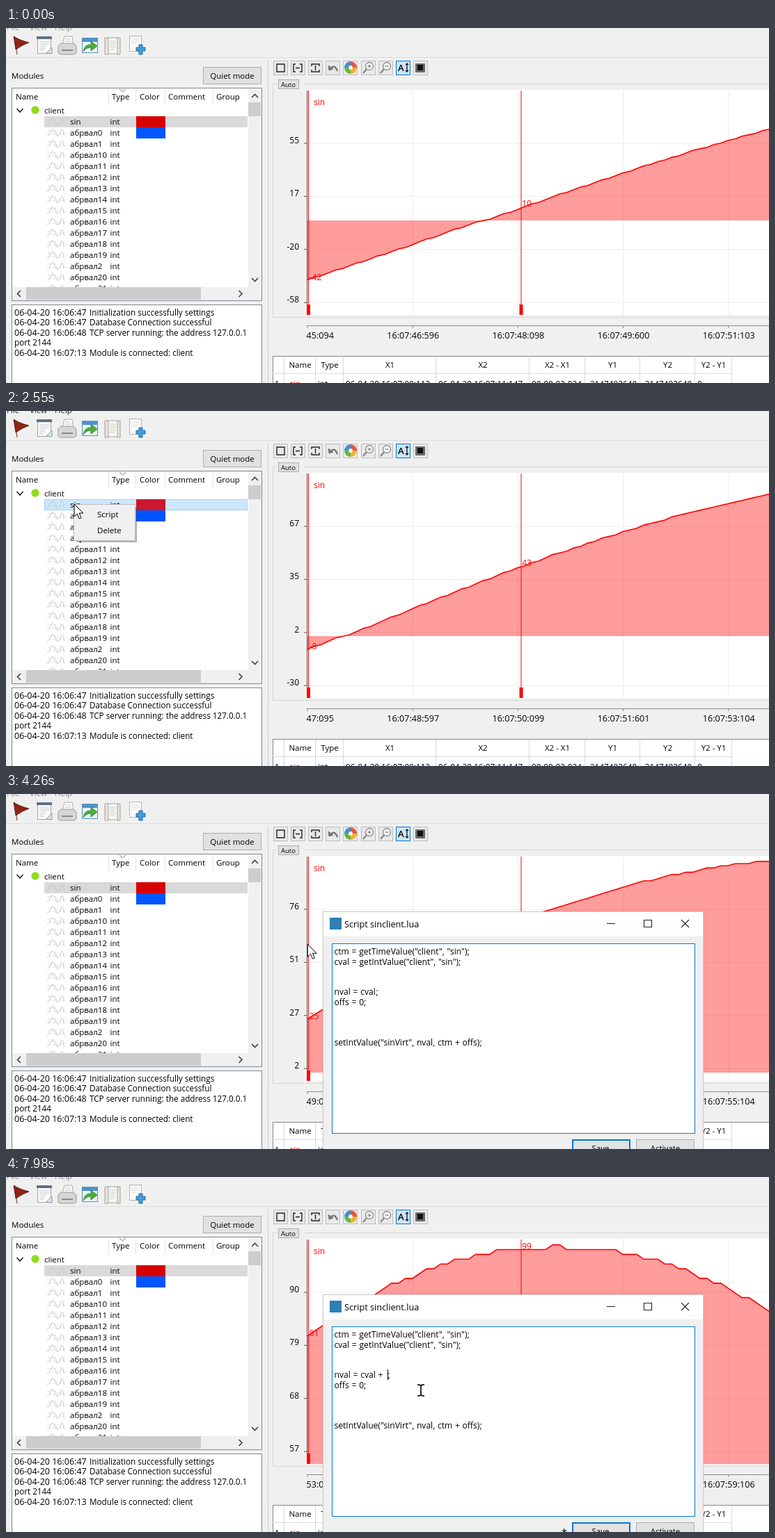
Animation, 1096 px wide and 511 px high, one loop 8 s. Source, as an HTML page:

```html
<!DOCTYPE html>
<html lang="en">
<head>
<meta charset="utf-8">
<title>Script editor over a live chart</title>
<style>
html, body { margin: 0; width: 100%; height: 100%; overflow: hidden; background: #f0f0f0; }
svg { display: block; width: 100vw; height: 100vh; }
text { font-family: "Open Sans", "Noto Sans", sans-serif; white-space: pre; }
.code { word-spacing: .6px; }
</style>
</head>
<body>
<svg id="stage" viewBox="0 0 1096 511" xmlns="http://www.w3.org/2000/svg"></svg>
<script>
const LOOP = 8000;
const GRID_X = 151.2, GRID_Y = 76.4, PLOT_X = 433, TOP_Y = 166, SAMPLE = 10.066;
const stage = document.getElementById('stage');

const rect = (x, y, w, h, fill, extra = '') =>
  `<rect x="${x}" y="${y}" width="${w}" height="${h}" fill="${fill}" ${extra}/>`;
const frame = (x, y, w, h, fill, stroke, extra = '') =>
  rect(x + .5, y + .5, w - 1, h - 1, fill, `stroke="${stroke}" ${extra}`);
const path = (d, stroke, width = 1, fill = 'none', extra = '') =>
  `<path d="${d}" stroke="${stroke}" stroke-width="${width}" fill="${fill}" ${extra}/>`;
const label = (x, y, s, size = 11.5, extra = '') =>
  `<text x="${x}" y="${y}" font-size="${size}" ${extra}>${s}</text>`;
const mid = 'text-anchor="middle"';

function mainToolbar() {
  return ['File', 'View', 'Help'].map((s, i) => label([1, 34, 70][i], 3, s, 11.5, 'class="bar"')).join('') +
    path('M0 42.5H1096', '#dcdcdc') +
    // flag
    path('M12 12L16 38', '#8a6f60', 1.6) + path('M11 12Q18 17 33 21Q24 24 14 31Z', '#4d130d', .8, '#8d2415') +
    // notebook
    frame(45, 14, 20, 23, '#fbfbfb', '#9aa3ad') + rect(44, 12, 22, 4, '#5f7186') +
    path('M48 20H62M48 23H62M48 26H58M48 29H56M48 32H55', '#bcc6d0') + path('M58 36L66 28V37Z', '#8a95a0', 1, '#dfe4e9') +
    // printer
    path('M81 24L84 12H95L97 24', '#aaa', 1, '#fff') + path('M85 16H93M84 19H94', '#c4c4c4') +
    path('M75 26L79 22H97L101 26V36L98 38H78L75 36Z', '#999', 1, '#d6d6d6') + rect(80, 31, 16, 2, '#8a8a8a') +
    // picture with arrow
    frame(109, 14, 23, 22, '#e9f3fb', '#5b8fb5') + rect(110, 15, 21, 5, '#4c94cf') +
    path('M111 34Q113 23 122 24V19L131 26L122 33V28Q115 28 111 34Z', '#2f7d25', .8, '#4bae3c') +
    // scroll
    path('M145 14H161V37H145Z', '#a5a29a', 1, '#fafaf8') + path('M142 14H147V38H142ZM160 14H164V38H160Z', '#a5a29a', 1, '#e6e4df') +
    path('M149 19H158M149 22H158M149 25H157M149 28H158M149 31H156', '#c8c5bd') +
    // page with plus
    frame(177, 11, 18, 23, '#fafafa', '#b5b5b5') + path('M180 16H192M180 19H192M180 22H188', '#ddd') +
    path('M187 28H191V24H196V28H200V33H196V38H191V33H187Z', '#246ca5', 1, '#459bd8');
}

function chartToolbar() {
  const bold = d => path(d, '#222', 1.4);
  let s = '';
  for (let i = 0; i < 9; i++) {
    const on = i === 7;
    s += frame(Math.round(384 + i * 25.1), 47, 21, 21, on ? '#cce4f7' : '#e9e9e9', on ? '#0078d7' : '#bdbdbd');
  }
  s += bold('M389 52H400V63H389Z') +
    bold('M416 52H413V63H416M422 52H425V63H422M416 57.5H422') +
    bold('M439 55V52H450V55M439 60V63H450V60M444.5 54V61') +
    path('M465 59Q472 51 476 62', '#777', 2.4) + path('M463 54L464 61L470 59Z', '#777', 1, '#777');
  ['#e8533c', '#f0b429', '#69b543', '#3c91d6'].forEach((c, i) => {
    s += path('M495 57V48A9 9 0 0 1 504 57Z', 'none', 0, c, `transform="rotate(${i * 90} 495 57)"`);
  });
  s += '<circle cx="495" cy="57" r="3" fill="#f4f4f4"/>';
  for (const x of [522, 547])
    s += `<circle cx="${x}" cy="55" r="5.5" fill="#f7f7f7" stroke="#888" stroke-width="1.3"/>` +
      path(`M${x - 4} 59L${x - 9} 65`, '#888', 2.4) + path(`M${x - 2.5} 55H${x + 2.5}` + (x < 530 ? `M${x} 52.5V57.5` : ''), '#666');
  return s + label(563, 62, 'A', 13, 'font-weight="600"') + bold('M576 51V63M574 53L576 51L578 53M574 61L576 63L578 61') +
    rect(588, 51, 14, 13, '#6a6a6a', 'rx="1"') + rect(591, 53, 8, 8, '#111');
}

function treePanel() {
  const ids = ['0', '1', 10, 11, 12, 13, 14, 15, 16, 17, 18, 19, 2, 20, 21];
  let s = label(8, 73, 'Modules') + frame(283, 56, 84, 25, '#e1e1e1', '#adadad') + label(325, 73, 'Quiet mode', 11.5, mid) +
    frame(8, 86, 360, 307, '#fff', '#828790') +
    [['Name', 14], ['Type', 152], ['Color', 192], ['Comment', 233], ['Group', 302]].map(([n, x]) => label(x, 103, n)).join('') +
    path('M147.5 88V110M186.5 88V110M228.5 88V110M297.5 88V110', '#e2e2e2') + path('M163 88L167.5 92L172 88', '#777') +
    path('M15.5 116L20 121L24.5 116', '#222', 1.6) + '<circle cx="42" cy="118" r="5.7" fill="#8fdc1e"/>' + label(55, 123, 'client') +
    frame(55, 127, 292, 16, '#d9d9d9', '#d9d9d9', 'id="selected"') + rect(55, 0, 292, 16, '#e5f3ff', 'id="hover"') +
    rect(187, 127, 42, 16, '#d60000', 'id="swatch"') + rect(187, 143, 42, 16, '#0055ff') + '<g clip-path="url(#rows)">';
  ['sin', ...ids.map(n => 'абрвал' + n)].forEach((name, i) => {
    const y = 135 + i * 16;
    s += path(`M59 ${y + 4}C64 ${y + 4} 63 ${y - 6} 67 ${y - 5}S70 ${y + 6} 75 ${y + 4}S78 ${y - 7} 81 ${y - 4}S82 ${y + 4} 84 ${y + 4}`, '#c4c4c4') +
      path(`M60 ${y - 3}L73 ${y - 3}M72 ${y}H86M62 ${y + 2}H86`, '#d0d0d0', 1, 'none', 'stroke-dasharray="2 3"') +
      label(92, y + 4, name) + label(149.5, y + 4, 'int');
  });
  return s + '</g>' + rect(348, 87, 19, 305, '#f0f0f0') + rect(9, 373, 339, 19, '#f0f0f0') +
    rect(348, 107, 18, 20, '#cdcdcd') + rect(29, 373, 251, 18, '#cdcdcd') +
    path('M353 100L357.5 95.5L362 100M353 360L357.5 364.5L362 360M21 378L16.5 382.5L21 387M334.5 378L339 382.5L334.5 387', '#444', 1.7);
}

function logPanel() {
  const lines = [['47', 'Initialization successfully settings', '06'], ['47', 'Database Connection successful', '06'],
    ['48', 'TCP server running: the address 127.0.0.1', '06'], null, ['13', 'Module is connected: client', '07']];
  return frame(8, 398, 360, 120, '#fff', '#828790') + lines.map((l, i) => {
    const y = 413.5 + i * 14.5;
    return l ? label(12, y, `06-04-20 16:${l[2]}:${l[0]}`, 12.5) + label(120, y, l[1], 11.7) : label(12, y, 'port 2144', 11.7);
  }).join('');
}

function chartPanel() {
  let s = path('M376.5 46V511', '#cfcfcf') + path('M429 80.5H1096M389 80.5H383.5V416.5H1096', '#d5d5d5') +
    frame(391, 74, 30, 14, '#e1e1e1', '#adadad') + label(405.5, 85, 'Auto', 9.5, mid) +
    rect(432, 89, 664, 324, '#fff') + path('M432.5 428.5H1096', '#8a8a8a');
  let grid = '';
  for (let i = 0; i < 5; i++) {
    const x = PLOT_X + i * GRID_X, y = TOP_Y + i * GRID_Y;
    if (i) grid += `M${x.toFixed(1)} 90V413`;
    s += path(`M${x.toFixed(1)} 428V432`, '#8a8a8a') +
      `<g clip-path="url(#axis)">${label(x + .5, 446.5, '', 12.6, `${mid} class="time"`)}</g>`;
    if (i < 4) {
      grid += `M432 ${y}H1096`;
      s += path(`M428 ${y}H433`, '#555') + label(421, y, '', 12, 'text-anchor="end" class="level"');
    }
  }
  s += path(grid, '#ececec') + path('M432.5 90V413', '#555') + '<g clip-path="url(#plot)">' +
    path('', 'none', 0, '#f00', 'id="area" fill-opacity=".39"') + path('', '#f00', 1.6, 'none', 'id="curve"') + '</g>';
  for (const x of [434.5, 740])
    s += path(`M${x} 90V413`, '#f00') + rect(x - 2.5, 398, 5, 15, '#f00') + label(x + 1.2, 0, '', 12, 'class="mark" fill="#f00"');
  return s + label(442, 111, 'sin', 12, 'fill="#f00"');
}

function table() {
  const edges = [383, 400, 445, 485, 618, 752, 832, 911, 990, 1043];
  const heads = ['', 'Name', 'Type', 'X1', 'X2', 'X2 - X1', 'Y1', 'Y2', 'Y2 - Y1'];
  const cells = ['1', 'sin', 'int', '06-04-20 16:07:09:112', '06-04-20 16:07:11:147', '00-00-02-034', '-2147483648', '-2147483648', '0'];
  let s = rect(383, 472, 713, 40, '#fff') + path('M383 472.5H1096M383.5 472V511', '#828790') + path('M383 497.5H1043', '#dcdcdc');
  heads.forEach((h, i) => {
    s += path(`M${edges[i + 1] - .5} 473V511`, '#d8d8d8') + label((edges[i] + edges[i + 1]) / 2, 489, h, 11.5, mid) +
      label(edges[i] + (i === 1 ? 7 : 3), 517, cells[i], 11.8, i === 1 ? 'fill="#d00"' : '');
  });
  return s;
}

function dialog() {
  const line = (n, s, extra = '') => label(471.5, 231 + n * 14.5, s, 12.1, 'class="code" ' + extra);
  return '<g id="dialog">' + rect(454, 168, 549, 350, '#000', 'opacity=".06"') +
    frame(455, 169, 547, 360, '#f0f0f0', '#d0d0d0') + rect(456, 170, 545, 35, '#fff') +
    rect(465, 178, 17, 17, '#2f7fb5') + label(486, 191.5, 'Script sinclient.lua', 12.7) +
    path('M863 186.5H875M916.5 181.5H927.5V191.5H916.5ZM970 181L981 192M981 181L970 192', '#222', 1.1) +
    frame(468, 215, 522, 274, '#fff', '#0078d7') +
    line(0, 'ctm = getTimeValue("client", "sin");') + line(1, 'cval = getIntValue("client", "sin");') +
    line(4, '', 'id="edit"') + line(4, ';', 'id="semi"') + line(5, 'offs = 0;') +
    line(9, 'setIntValue("sinVirt", nval, ctm + offs);') +
    rect(472, 219, 1, 15, '#000', 'id="caret"') +
    label(798, 517, '*', 14, 'id="dirty"') +
    rect(814, 498, 82, 26, '#e1e1e1', 'stroke="#0078d7" stroke-width="2"') + label(854, 513.5, 'Save', 11.5, mid) +
    frame(905, 497, 84, 28, '#e1e1e1', '#adadad') + label(947, 513.5, 'Activate', 11.5, mid) + '</g>';
}

const popup = () => '<g id="menu">' + rect(101, 139, 87, 50, '#000', 'opacity=".3"') +
  frame(97, 134, 89, 53, '#f0f0f0', '#bdbdbd') + rect(100, 137, 82, 23, '#91c9f7', 'id="item"') +
  label(131, 152.5, 'Script') + label(131, 176, 'Delete') + '</g>';

const pointer = () => '<g id="pointer">' +
  path('M0 0V18L4.2 14L7.2 21L10.2 19.8L7.2 13H13Z', '#000', 1, '#fff', 'id="arrow"') +
  path('M-5 -8H-2L0 -6.5L2 -8H5M0 -6.5V6.5M-5 8H-2L0 6.5L2 8H5', '#000', 1.6, 'none', 'id="beam"') + '</g>';

const clip = (id, x, y, w, h) => `<clipPath id="${id}">${rect(x, y, w, h, '#000')}</clipPath>`;

stage.innerHTML = '<defs>' + clip('rows', 9, 110, 339, 263) + clip('plot', 432, 90, 664, 323) + clip('axis', 431.5, 425, 665, 40) + '</defs>' +
  rect(0, 0, 1096, 511, '#f0f0f0') + mainToolbar() + treePanel() + logPanel() + chartToolbar() + chartPanel() + table() +
  popup() + dialog() + pointer();

const $ = id => document.getElementById(id);
const all = name => [...stage.querySelectorAll('.' + name)];
const times = all('time'), levels = all('level'), marks = all('mark'), bar = all('bar');
const show = (id, on) => $(id).setAttribute('visibility', on ? 'inherit' : 'hidden');
const set = (el, attrs) => { for (const k in attrs) el.setAttribute(k, attrs[k]); };
const clamp = v => Math.max(0, Math.min(1, v));

// Chart state changes about once a second: value at the top grid line and value per grid row.
const ticks = [830, 1830, 2860, 3860, 4870, 5840, 6820, 7900];
const topValue = [54.9, 62.3, 67.2, 71.8, 75.8, 80.1, 84, 87.3, 90.1];
const rowValue = [37.65, 35.7, 32.4, 28.7, 24.6, 20.8, 17, 13.9, 11.05];

// One degree per sample; the signal lags by one sample after its peak.
function sample(i) {
  const deg = i - 25 - (i > 115 ? 1 : 0);
  return Math.trunc(100 * Math.sin(deg * Math.PI / 180) + 1e-9);
}

function drawChart(k) {
  const yOf = v => TOP_Y + (topValue[k] - v) / rowValue[k] * GRID_Y;
  const pts = [];
  for (let i = 0; i <= 67; i++)
    pts.push((PLOT_X + i * SAMPLE).toFixed(1) + ' ' + yOf(sample(10 * k + i)).toFixed(1));
  const d = 'M' + pts.join('L');
  $('curve').setAttribute('d', d);
  $('area').setAttribute('d', `${d}V${Math.round(yOf(0))}H${PLOT_X}Z`);
  levels.forEach((el, i) => { el.textContent = Math.round(topValue[k] - i * rowValue[k]); });
  marks.forEach((el, i) => {
    const v = sample(10 * k + i * 31);
    el.textContent = v;
    el.setAttribute('y', yOf(v));
  });
  const start = Math.floor(45094.2 + k * 1000.4);
  times.forEach((el, i) => {
    const ms = start + Math.floor(i * 1502.25);
    el.textContent = `16:07:${Math.floor(ms / 1000)}:${String(ms % 1000).padStart(3, '0')}`;
  });
}

// Pointer track: time, x, y
const track = [[430, 689, 396], [510, 629, 373], [830, 629, 373], [900, 200, 230], [1130, 200, 230], [1440, 94, 143.2],
  [1520, 94, 143.2], [1830, 98, 134], [2860, 98, 134], [3160, 123, 141], [4180, 123, 141], [4260, 433, 216],
  [4640, 517, 318], [4870, 517, 318], [5100, 529, 307], [5260, 529, 307], [5410, 529, 299], [5810, 529, 299],
  [6040, 531.5, 295], [6270, 531.5, 289], [6820, 531.5, 289], [6890, 596, 307]];

function pointerAt(t) {
  const n = track.findIndex(p => p[0] > t);
  if (n < 0) return track[track.length - 1].slice(1);
  if (n === 0) return null;
  const [a, b] = [track[n - 1], track[n]], f = (t - a[0]) / (b[0] - a[0]);
  return [a[1] + (b[1] - a[1]) * f, a[2] + (b[2] - a[2]) * f];
}

function drawPointer(t) {
  const pos = pointerAt(t);
  show('pointer', pos);
  let row = -1;
  if (pos) {
    const [x, y] = pos, inText = t > 3800 && x > 468 && y > 215;
    $('pointer').setAttribute('transform', `translate(${x} ${y})`);
    show('arrow', !inText);
    show('beam', inText);
    if (x >= 55 && x < 347 && y >= 127 && y < 373) row = Math.floor((y - 127) / 16);
  }
  const hot = row === 0;
  set($('selected'), { fill: hot ? '#cce8ff' : '#d9d9d9', stroke: hot ? '#99d1ff' : '#d9d9d9' });
  $('swatch').setAttribute('fill', hot ? '#cc1730' : '#d60000');
  show('hover', row > 0);
  $('hover').setAttribute('y', 127 + row * 16);
}

function drawMenu(t) {
  const open = t >= 2220 && t < 3390;
  bar.forEach(el => el.setAttribute('fill', open ? '#222' : '#8a8a8a'));
  show('menu', open);
  $('menu').setAttribute('opacity', clamp((t - 2220) / 250));
  show('item', t >= 2930);
}

function drawDialog(t) {
  show('dialog', t >= 3550);
  const p = clamp((t - 3550) / 170), e = 1 - (1 - p) ** 2, s = .945 + .055 * e;
  set($('dialog'), { opacity: e, transform: `translate(728.5 352) scale(${s}) translate(-728.5 -352)` });

  const typed = [7580, 7900, 7970].filter(at => t >= at).length;
  const edge = [531, 535, 545, 548][typed];
  $('edit').textContent = 'nval = cval' + (typed > 1 ? ' +' : '');
  $('semi').setAttribute('x', edge + .5);
  show('dirty', typed);

  const clicked = t >= 6650;
  const lit = clicked ? t < 7200 || t >= 7750 : t < 4030 || (t >= 4560 && t < 5100) || (t >= 5640 && t < 6170);
  set($('caret'), { x: clicked ? edge : 472, y: clicked ? 277 : 219 });
  show('caret', lit);
}

let shown = -1;
function render(t) {
  const k = ticks.filter(at => t >= at).length;
  if (k !== shown) drawChart(shown = k);
  drawMenu(t);
  drawDialog(t);
  drawPointer(t);
}

const begin = performance.now();
function loop() {
  render((performance.now() - begin) % LOOP);
  requestAnimationFrame(loop);
}
loop();
</script>
</body>
</html>
```
